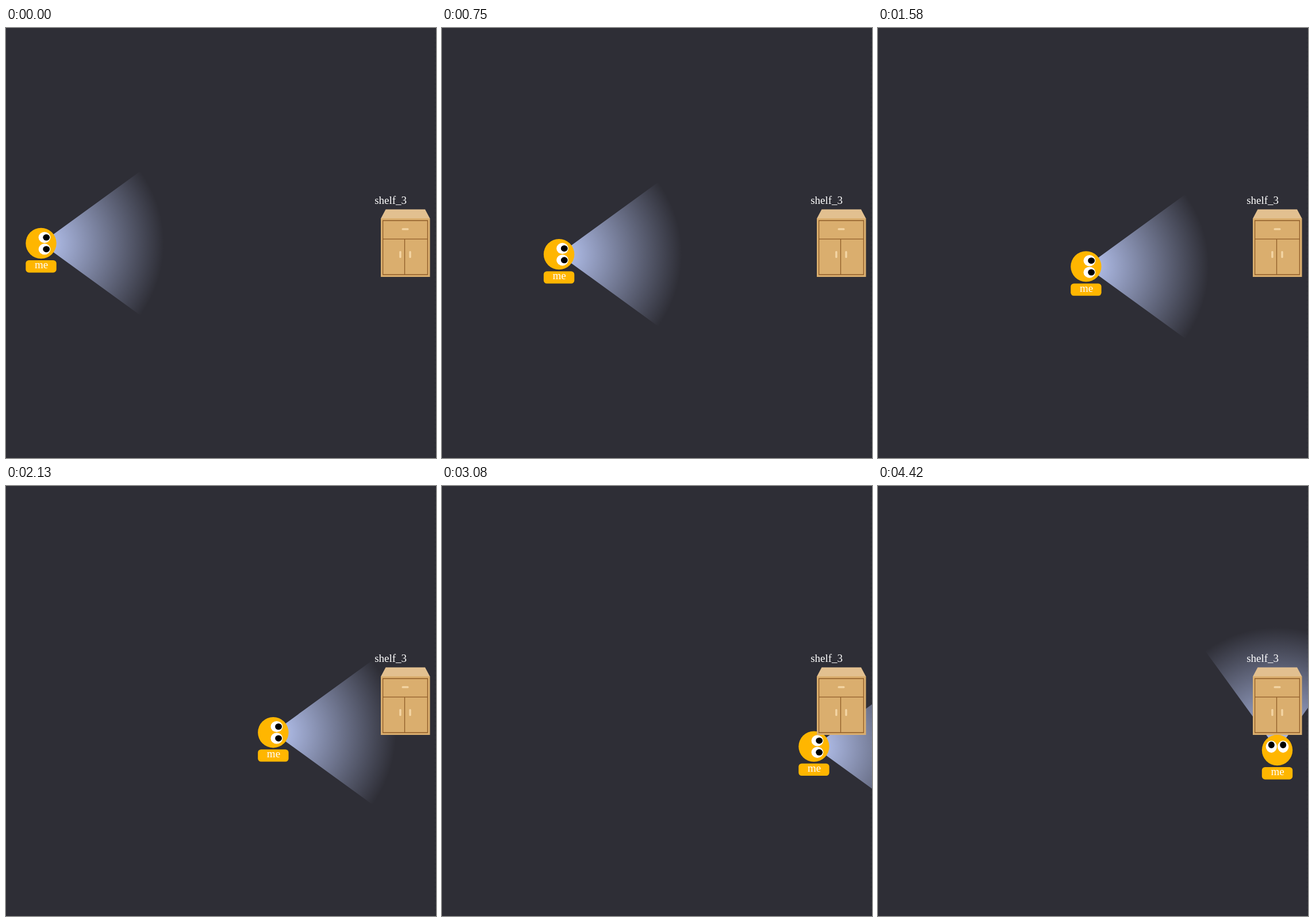
Write an HTML page that moves like this. It is 748 px wide and 748 px high and loops after 4.71 s.

```html
<!DOCTYPE html>
<html lang="en">
<head>
<meta charset="utf-8">
<title>Robot walks to the shelf</title>
<style>
  html, body { margin: 0; height: 100%; overflow: hidden; background: #2e2e36; }
  svg { display: block; width: 100%; height: 100%; }
  text { font: 19px "Liberation Serif", "Times New Roman", serif; fill: #fff; }
</style>
</head>
<body>
<svg viewBox="0 0 748 748">
  <defs>
    <radialGradient id="beam" gradientUnits="userSpaceOnUse" cx="0" cy="0" r="213.7">
      <stop offset="0" stop-color="#bac8f6"/>
      <stop offset="1" stop-color="#bac8f6" stop-opacity="0"/>
    </radialGradient>
    <g id="eye">
      <ellipse cx="6" rx="10.4" ry="9.6" fill="#fff"/>
      <ellipse cx="9.2" rx="5.9" ry="5.5"/>
    </g>
  </defs>

  <path d="M746.5 0V748" stroke="#26282f" stroke-dasharray="3 5"/>

  <g id="robot">
    <g id="head">
      <path d="M0 0L172.9 -125.6A213.7 213.7 0 0 1 172.9 125.6Z" fill="url(#beam)"/>
      <circle r="26.7" fill="#ffb600"/>
      <use href="#eye" y="-10.2"/>
      <use href="#eye" y="10.2"/>
    </g>
    <rect x="-26.7" y="29.5" width="53.4" height="21.4" rx="5.5" fill="#ffb600"/>
    <text x=".6" y="43.7" text-anchor="middle">me</text>
  </g>

  <g id="shelf">
    <path d="M652 331.5L660.5 315.5H729L737.5 331.5Z" fill="#e2c090"/>
    <path d="M652 331H737.5V433H652Z" fill="#daae6e"/>
    <path d="M655.6 335H733.4V429H655.6ZM655.6 367.2H733.4M693.5 367.2V429"
          fill="none" stroke="#8f5c28" stroke-width="1.3"/>
    <g fill="#f3d5a4">
      <rect x="688.5" y="348.2" width="12" height="3.4" rx="1.5"/>
      <rect x="684.2" y="388" width="3.4" height="12" rx="1.5"/>
      <rect x="701.3" y="388" width="3.4" height="12" rx="1.5"/>
    </g>
    <text x="641.2" y="306">shelf_3</text>
  </g>
</svg>
<script>
const LOOP = 4710, FPS = 24;
const WALK_STEPS = 80, TURN_START = 81, TURN_STEPS = 25;
const from = { x: 61, y: 374.5 }, to = { x: 694.5, y: 459.5 };
const robot = document.getElementById("robot");
const head = document.getElementById("head");
const clamp = v => Math.min(1, Math.max(0, v));
const mix = (a, b, p) => a + (b - a) * p;
const start = performance.now();

function draw() {
  const time = (performance.now() - start) % LOOP;
  const step = Math.floor(time * FPS / 1000 + 0.1);
  const walk = clamp(step / WALK_STEPS);
  const turn = clamp((step - TURN_START) / TURN_STEPS);
  robot.setAttribute("transform", `translate(${mix(from.x, to.x, walk)} ${mix(from.y, to.y, walk)})`);
  head.setAttribute("transform", `rotate(${-90 * turn})`);
  requestAnimationFrame(draw);
}
draw();
</script>
</body>
</html>
```
